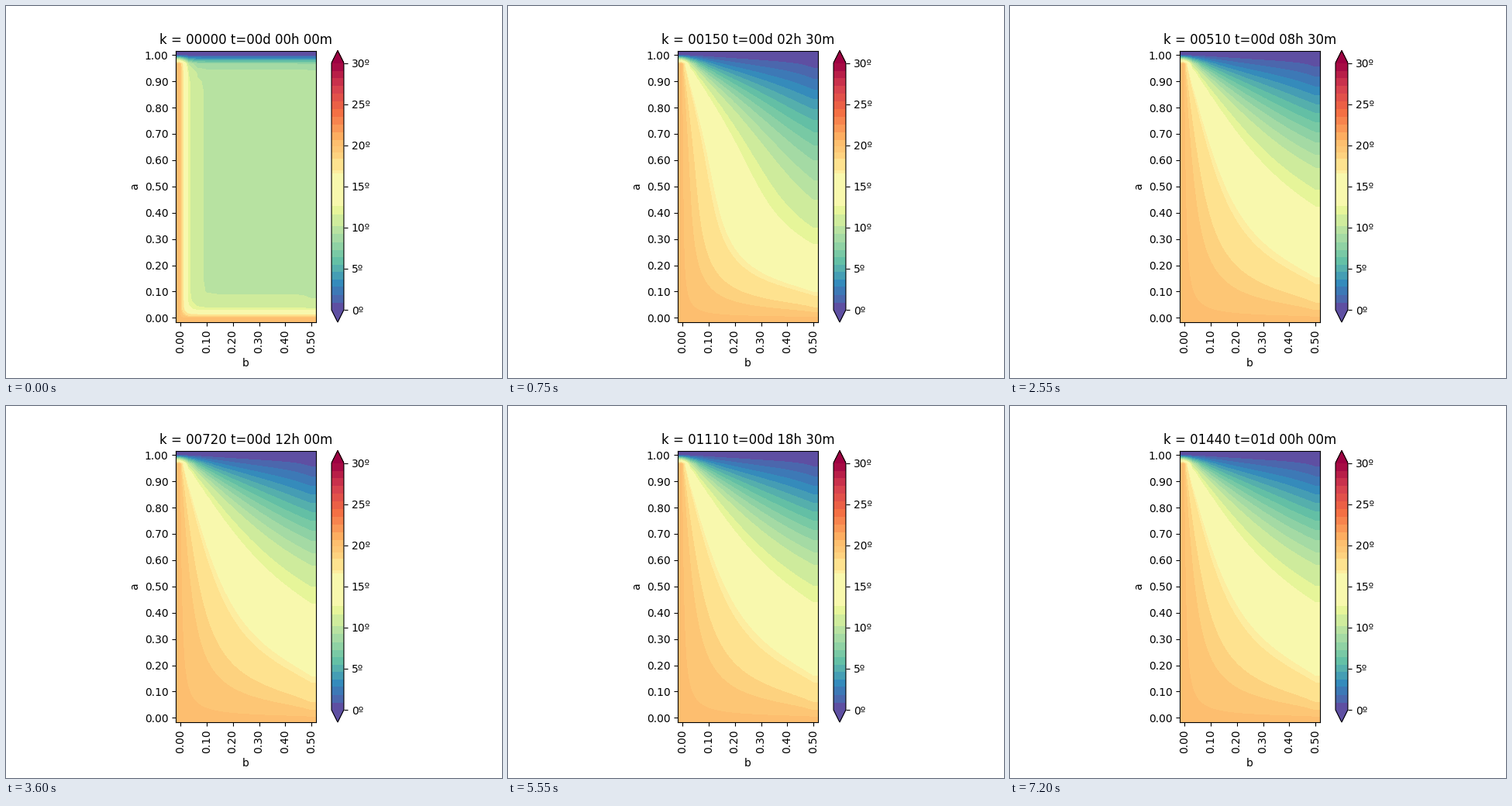
Animation of 640x480 px, one loop 7350 ms. Source, as a matplotlib script:

```python
import numpy as np
import matplotlib.pyplot as plt
from matplotlib.animation import FuncAnimation
from matplotlib.colors import BoundaryNorm, ListedColormap

plt.rcParams["font.family"] = "DejaVu Sans"

FRAMES, INTERVAL = 49, 150
STEPS = 30                  # one-minute steps per frame
NX, NY = 16, 31
DX = 1 / 30
R = 0.28                    # diffusivity * dt / dx^2
FLUX = 10.0                 # outward gradient on the right side
HOT, COLD, START = 20.0, 0.0, 10.0


def implicit_system():
    """Matrix and load of one backward Euler step: A @ new = old + load."""
    n = NX * NY
    mat, load = np.eye(n), np.zeros(n)
    for j in range(1, NY - 1):
        for i in range(1, NX):
            p = j * NX + i
            mat[p, p] += 4 * R
            mat[p, p - NX] -= R
            mat[p, p + NX] -= R
            if i < NX - 1:
                mat[p, p - 1] -= R
                mat[p, p + 1] -= R
            else:
                mat[p, p - 1] -= 2 * R
                load[p] = -2 * R * FLUX * DX
    return mat, load


def simulate():
    field = np.full((NY, NX), START)
    field[:, 0] = HOT
    field[0] = HOT
    field[-1] = COLD
    fixed = np.zeros((NY, NX))
    fixed[:, 0] = fixed[0] = fixed[-1] = 1
    field, fixed = field.ravel(), fixed.ravel()

    mat, load = implicit_system()
    inv = np.linalg.inv(mat)
    steady = np.linalg.solve(mat - np.eye(len(load)) + np.diag(fixed),
                             load + fixed * field)
    jump = np.linalg.matrix_power(inv, STEPS)
    dev = inv @ (field - steady)
    states = []
    for _ in range(FRAMES):
        states.append((steady + dev).reshape(NY, NX))
        dev = jump @ dev
    return states


def band_colors():
    levels = np.concatenate([
        [0, 0.85, 1.8, 2.8, 3.7, 4.6, 5.5, 6.4, 7.3, 8.2, 9.2, 10.15,
         11.6, 12.6, 16.6, 17, 18.4, 19.1, 19.85],
        np.linspace(20.6, 30, 11)])
    spectral = plt.get_cmap("Spectral_r")
    mids = (levels[:-1] + levels[1:]) / 2
    colors = [spectral(m / 30) for m in mids]
    colors[0] = spectral(0.0)
    colors[13] = "#f8f8ad"
    colors[14] = "#fdeda0"
    colors[18] = spectral(HOT / 30)
    cmap = ListedColormap([spectral(0.0), *colors, spectral(1.0)])
    return cmap, BoundaryNorm(levels, cmap.N, extend="both")


def caption(k):
    days, rest = divmod(k, 1440)
    hours, minutes = divmod(rest, 60)
    return f"k = {k:05d} t={days:02d}d {hours:02d}h {minutes:02d}m"


states = simulate()
cmap, norm = band_colors()

fig, ax = plt.subplots(figsize=(6.4, 4.8), dpi=100, facecolor="white")
fig.subplots_adjust(left=0.125, right=0.75, bottom=0.15, top=0.88)
half = DX / 2
image = ax.imshow(states[0], origin="lower", cmap=cmap, norm=norm,
                  extent=(-half, 0.5 + half, -half, 1 + half),
                  interpolation="bilinear", interpolation_stage="data")
ax.set_xticks(np.arange(6) / 10)
ax.set_yticks(np.arange(11) / 10)
ax.xaxis.set_major_formatter("{x:.2f}")
ax.yaxis.set_major_formatter("{x:.2f}")
ax.tick_params(axis="x", rotation=90)
ax.set_xlabel("b")
ax.set_ylabel("a")
title = ax.set_title(caption(0))

ticks = list(range(0, 31, 5))
bar = fig.colorbar(image, ax=ax, ticks=ticks, aspect=22,
                   spacing="proportional", extendfrac=0.05)
bar.minorticks_off()
bar.set_ticklabels([f"{t}º" for t in ticks])


def update(i):
    image.set_data(states[i])
    title.set_text(caption(i * STEPS))
    return image, title


anim = FuncAnimation(fig, update, frames=FRAMES, interval=INTERVAL,
                     repeat=True, repeat_delay=0, blit=False)
plt.show()
```
